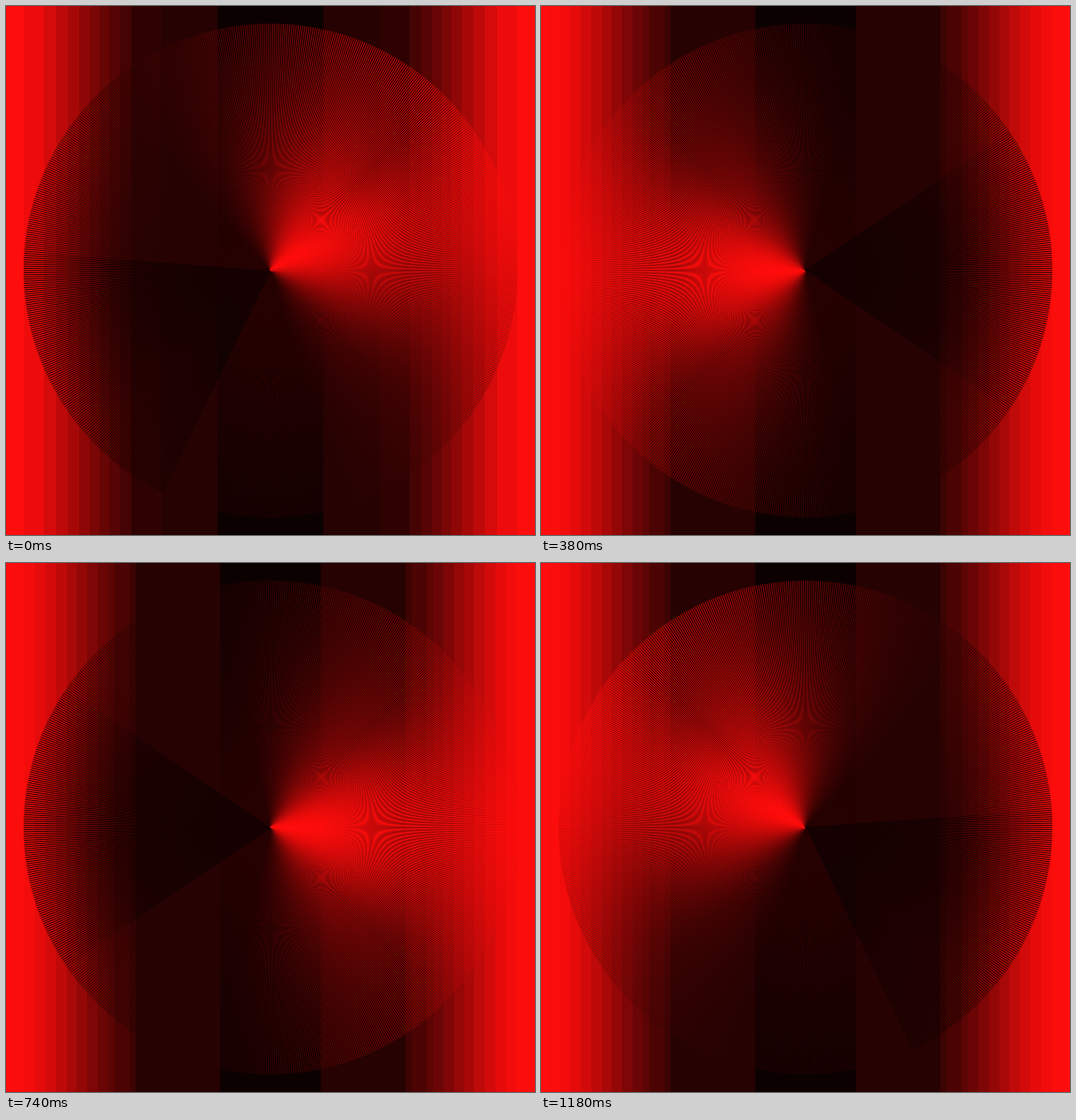
Recreate the animation shown at these times as an HTML page with a canvas. Size 600 by 600 pixels, loop 1.2 s.

```html
<!DOCTYPE html>
<html>
<head>
<meta charset="utf-8">
<style>
  html, body { margin: 0; height: 100%; overflow: hidden; background: #000; }
  canvas { display: block; }
</style>
</head>
<body>
<canvas id="stage" width="600" height="600"></canvas>
<script>
const ctx = document.getElementById('stage').getContext('2d');
const SIZE = 600, MID = 300, RADIUS = 280, LINES = 720;
const LOOP = 1200, TICK = 20;

// Distances from the edge where the backdrop steps to its next shade
const OPENING = [0, 20, 43, 57, 70, 83, 95, 106, 117, 129, 142, 176, 240, MID];
const STEADY = [0, 8, 21, 33, 45, 57, 69, 80, 92, 104, 115, 123, 140, 147, 243, MID];

const red = v => `rgb(${Math.round(v)},${Math.round(v / 20)},${Math.round(v / 22)})`;

// Falls from full red at 0 to a dark tail at MID
const falloff = d => 26 + 229 * Math.cos(d / MID * Math.PI / 2) ** 6;

function drawBackdrop(edges) {
  const last = edges.length - 2;
  for (let i = 0; i <= last; i++) {
    const a = edges[i], b = edges[i + 1];
    const v = i === last ? 12 : i === last - 1 ? 38 : falloff((a + b) / 2);
    ctx.fillStyle = red(v);
    ctx.fillRect(a, 0, b - a, SIZE);
    ctx.fillRect(SIZE - b, 0, b - a, SIZE);
  }
}

function drawFan(peak) {
  ctx.lineWidth = 1;
  for (let i = 0; i < LINES; i++) {
    const degrees = i * 360 / LINES;
    const turn = (((degrees - peak) % 360) + 360) % 360;
    const d = Math.min(turn, 360 - turn) / 180 * MID;
    const angle = degrees * Math.PI / 180;
    ctx.strokeStyle = red(d > 243 ? 22 : Math.max(38, falloff(d)));
    ctx.beginPath();
    ctx.moveTo(MID, MID);
    ctx.lineTo(MID + RADIUS * Math.cos(angle), MID + RADIUS * Math.sin(angle));
    ctx.stroke();
  }
}

let shown = -1;
function render(now) {
  const tick = Math.floor(now % LOOP / TICK);
  if (tick !== shown) {
    shown = tick;
    drawBackdrop(tick ? STEADY : OPENING);
    drawFan(30 * Math.floor((tick - 1) / 3));
  }
  requestAnimationFrame(() => render(performance.now() - start));
}
const start = performance.now();
render(0);
</script>
</body>
</html>
```
